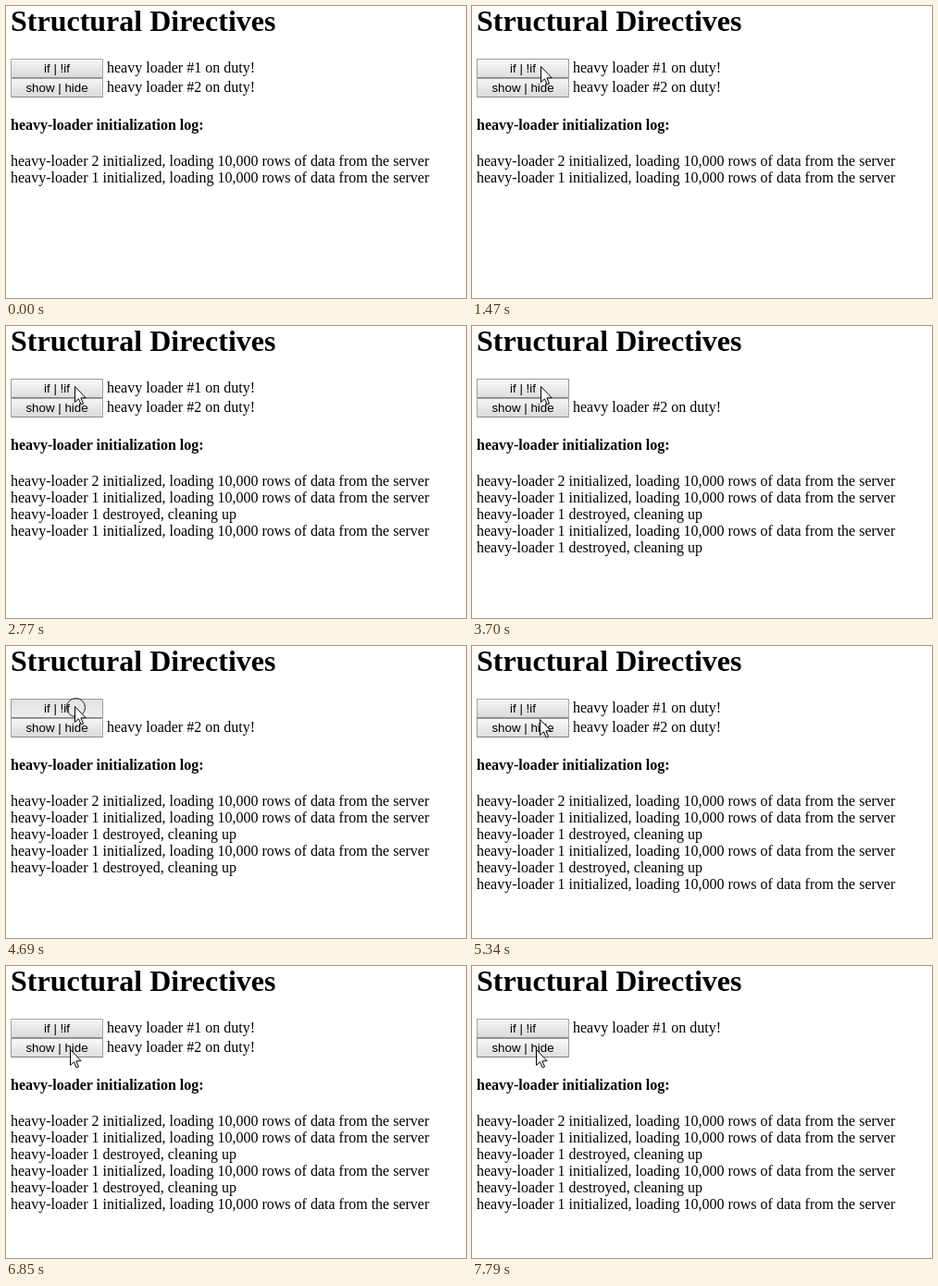
An HTML page with a canvas that plays this animation: 497x316 px, repeating every 8000 ms.

```html
<!DOCTYPE html>
<html lang="en">
<head>
<meta charset="utf-8">
<title>Structural Directives</title>
<style>
  html, body { margin: 0; width: 100%; height: 100%; overflow: hidden; background: #fff; }
  body { position: relative; color: #000; font: 16px/18px "Liberation Serif", "Times New Roman", serif; }
  body > * { position: absolute; left: 5px; margin: 0; white-space: pre; }
  h1 { top: -2px; font-size: 32px; line-height: 36px; }
  h4 { top: 120px; font-size: 16px; }
  .btn {
    box-sizing: border-box; width: 100px; height: 21px; padding-top: 2px;
    border: 1px solid #a6a6a6; border-bottom-color: #8c8c8c; border-radius: 1px;
    background: linear-gradient(#f5f5f5, #dadada);
    font: 13.333px/15px "Liberation Sans", Arial, sans-serif; text-align: center;
  }
  .btn.hover { border-color: #999 #999 #808080; background: linear-gradient(#f8f8f8, #dedede); }
  .btn.down { background: linear-gradient(#e2e2e2, #ededed); }
  #if { top: 57px; }
  #show { top: 78px; }
  .duty { left: 109px; }
  #duty1 { top: 58px; }
  #duty2 { top: 79px; }
  #log { top: 159px; }
  canvas { left: 0; top: 0; }
</style>
</head>
<body>
<h1>Structural Directives</h1>
<div class="btn" id="if">if | !if</div>
<div class="duty" id="duty1">heavy loader #1 on duty!</div>
<div class="btn" id="show">show | hide</div>
<div class="duty" id="duty2">heavy loader #2 on duty!</div>
<h4>heavy-loader initialization log:</h4>
<div id="log"></div>
<canvas width="497" height="316"></canvas>
<script>
const LOOP = 8000;
const $ = id => document.getElementById(id);
const ctx = document.querySelector('canvas').getContext('2d');

// [time, x, y] of the pointer tip; it jumps from place to place
const path = [
  [680, 400, 145], [800, 326, 118], [930, 238, 95], [1050, 164, 78],
  [1190, 98, 69], [1320, 75, 66], [1470, 74, 65],
  [5190, 74, 66], [5340, 73, 79], [5460, 70, 87], [5580, 69, 90]
];
const presses = [[1750, 1900], [2640, 2770], [4690, 4810], [7660, 7790]];
const toggles1 = [1900, 2770, 3700, 4810];
const toggles2 = [6010, 6850, 7790];

const started = 'initialized, loading 10,000 rows of data from the server';
const entry = (n, text) => `heavy-loader ${n} ${text}`;
const count = (times, t) => times.filter(s => t >= s).length;

function drawPointer(x, y) {
  const shape = [[0, 0], [0, 17], [4, 13.3], [6.7, 19.5], [9, 18.5], [6.4, 12.4], [11.6, 12.2]];
  ctx.beginPath();
  for (const [px, py] of shape) ctx.lineTo(x + px + 0.5, y + py + 0.5);
  ctx.closePath();
  ctx.fillStyle = '#fff';
  ctx.fill();
  ctx.strokeStyle = '#000';
  ctx.stroke();
}

function drawRing(x, y) {
  ctx.beginPath();
  ctx.arc(x + 1.5, y + 1.5, 10, 0, 2 * Math.PI);
  ctx.strokeStyle = '#222';
  ctx.stroke();
}

function render(t) {
  const at = path.filter(p => t >= p[0]).pop();
  const pressed = presses.some(([a, b]) => t >= a && t < b);
  const flips = count(toggles1, t);

  $('duty1').hidden = flips % 2 === 1;
  $('duty2').hidden = count(toggles2, t) % 2 === 1;

  const lines = [entry(2, started), entry(1, started)];
  for (let i = 0; i < flips; i++) lines.push(entry(1, i % 2 ? started : 'destroyed, cleaning up'));
  const text = lines.join('\n');
  if ($('log').textContent !== text) $('log').textContent = text;

  for (const [id, top] of [['if', 57], ['show', 78]]) {
    const over = !!at && at[1] < 105 && at[2] >= top && at[2] < top + 21;
    $(id).classList.toggle('hover', over);
    $(id).classList.toggle('down', over && pressed);
  }

  ctx.clearRect(0, 0, 497, 316);
  if (!at) return;
  if (pressed) drawRing(at[1], at[2]);
  drawPointer(at[1], at[2]);
}

const start = performance.now();
function tick() {
  render((performance.now() - start) % LOOP);
  requestAnimationFrame(tick);
}
render(0);
requestAnimationFrame(tick);
</script>
</body>
</html>
```
